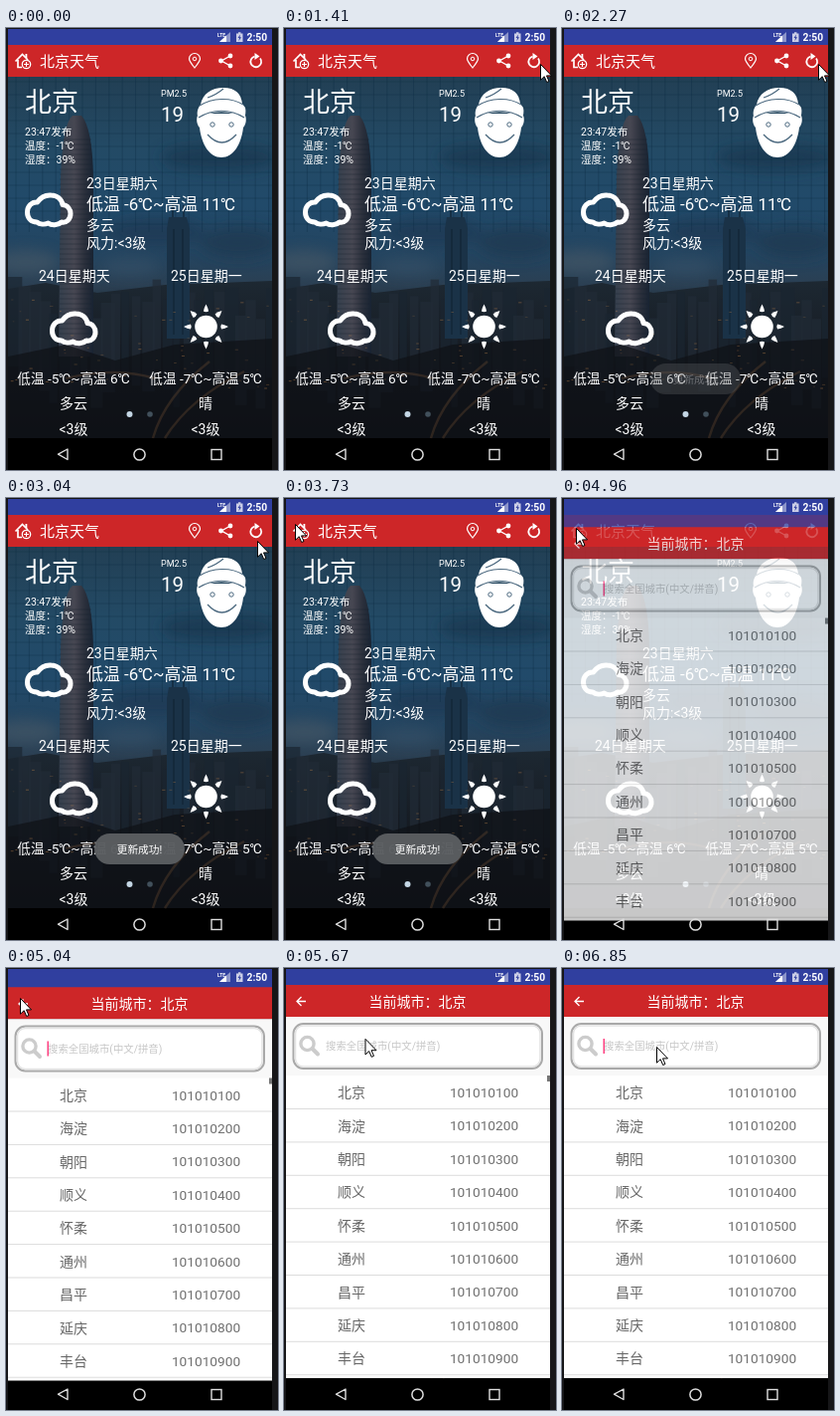
Recreate the animation shown at these times as an HTML page. Size 274 px wide and 444 px high, loop 8000 ms.

```html
<!DOCTYPE html>
<html lang="zh">
<head>
<meta charset="utf-8">
<style>
html, body { margin: 0; width: 100%; height: 100%; overflow: hidden; background: #161618; }
svg { display: block; width: 100%; height: 100%; }
text { font-family: Roboto, 'Noto Sans CJK SC', 'Noto Sans CJK', sans-serif; white-space: pre; }
</style>
</head>
<body>
<svg id="stage" viewBox="0 0 274 444"></svg>
<script>
const LOOP = 8000, STEP = 75;

const text = (x, y, size, str, fill = '#fff', anchor = 'start', extra = '') =>
  `<text x="${x}" y="${y}" font-size="${size}" fill="${fill}" text-anchor="${anchor}" ${extra}>${str.replace(/</g, '&lt;')}</text>`;
const mid = (x, y, size, str, fill) => text(x, y, size, str, fill, 'middle');
const rect = (x, y, w, h, fill, extra = '') =>
  `<rect x="${x}" y="${y}" width="${w}" height="${h}" fill="${fill}" ${extra}/>`;
const path = (d, fill, extra = '') => `<path d="${d}" fill="${fill}" ${extra}/>`;
const line = (d, color, width, extra = '') =>
  path(d, 'none', `stroke="${color}" stroke-width="${width}" ${extra}`);
const circle = (x, y, r, fill, extra = '') =>
  `<circle cx="${x}" cy="${y}" r="${r}" fill="${fill}" ${extra}/>`;
const ellipse = (x, y, rx, ry, fill, extra = '') =>
  `<ellipse cx="${x}" cy="${y}" rx="${rx}" ry="${ry}" fill="${fill}" ${extra}/>`;
const repeat = (n, f) => Array.from({ length: n }, (_, i) => f(i)).join('');

const gradient = (id, stops, end = 'x2="0" y2="1"') =>
  `<linearGradient id="${id}" x1="0" y1="0" ${end}>` +
  stops.map(([o, c]) => `<stop offset="${o}" stop-color="${c}"/>`).join('') + '</linearGradient>';

const defs = `<defs>
  ${gradient('sky', [[0, '#223f54'], [.2, '#234a65'], [.36, '#214a6a'], [.5, '#24445f'], [.58, '#2b3f52'], [.68, '#1c2630'], [1, '#0e1115']])}
  ${gradient('tower', [[0, '#343f4d'], [.45, '#474752'], [.75, '#2b303c'], [1, '#182332']], 'x2="1" y2="0"')}
  ${gradient('ground', [[0, '#1d2832'], [.4, '#171d25'], [1, '#0c0e12']])}
  <filter id="soft" x="-50%" y="-50%" width="200%" height="200%"><feGaussianBlur stdDeviation="7"/></filter>
  <clipPath id="phone"><rect x="2" y="1" width="266" height="443"/></clipPath>
</defs>`;

let seed = 7;
const rnd = () => (seed = seed * 16807 % 2147483647) / 2147483647;

function photo() {
  const grid = repeat(12, i => `M2 ${54 + i * 13}H268`) + repeat(20, i => `M${10 + i * 13.4} 48V205`);
  const floors = repeat(40, i => `M54 ${112 + i * 5}H86`);
  const blocks = repeat(26, i => rect(2 + i * 10.4, 250 + rnd() * 45, 6 + rnd() * 9, 90, rnd() < .5 ? '#1b2631' : '#222c37', 'opacity=".7"'));
  const lights = repeat(60, () => rect(4 + rnd() * 260, 272 + rnd() * 90, 1.5 + rnd() * 2, 1, '#b9804a', `opacity="${.15 + rnd() * .3}"`));
  const clouds = ellipse(215, 130, 60, 14, '#16324a') + ellipse(150, 205, 50, 14, '#1b3650') +
    ellipse(235, 215, 40, 16, '#1b344b') + ellipse(20, 235, 34, 12, '#4a5a68') + ellipse(125, 240, 30, 9, '#38526a');
  return rect(2, 48, 266, 364, 'url(#sky)') +
    `<g filter="url(#soft)" opacity=".6">${clouds}</g>` +
    line(grid, '#0d2a3f', 1, 'opacity=".3"') +
    path('M2 262L40 256L92 266L160 258L268 254V412H2Z', 'url(#ground)') + blocks +
    path('M53 330L55 150Q57 96 67 88H76Q87 100 88 150V330Z', 'url(#tower)') +
    line(floors, '#141d28', 1, 'opacity=".35"') +
    path('M162 312V202L164 190H182L185 202V312Z', '#1a3247') +
    line('M168 190V178M179 190V178M169 202V308M178 202V308', '#122636', 1.3) +
    path('M2 330L60 318L110 334L170 318L268 312V412H2Z', '#0f1217', 'opacity=".75"') + lights +
    line('M148 412Q160 370 205 335M160 412Q185 372 240 345M60 352Q110 340 150 352', '#6b4a33', 2.5, 'opacity=".35"');
}

const cloud = (x, y) => line(
  'M12 30C6 30 2.500 25.500 2.500 20C2.500 14 7 9.500 12.500 10C16 5 21 2.500 26.500 3C32.500 3.200 37 7 38 12.500C43 13 46 17 46 21.500C46 27 42 31 37 30C33 33.500 27 33.500 23.500 31C20 32.500 15 32.500 12 30Z',
  '#fff', 5, `stroke-linejoin="round" transform="translate(${x} ${y})"`);

const sun = (x, y) => `<g transform="translate(${x} ${y})">` + circle(0, 0, 11.3, '#fff') +
  repeat(8, i => path('M-2.6 -15.500Q0 -14 2.600 -15.500Q2 -19 0 -22.500Q-2 -19 -2.600 -15.500Z', '#fff', `transform="rotate(${i * 45})"`)) + '</g>';

const face = () => {
  const ink = '#4d6a80';
  return path('M194 86C191 90 192 97 195 100C197 117 205 130 217 130C229 130 237 117 239 100C242 97 243 90 240 86Z', '#fff') +
    path('M196 77C198 66 207 60 219 60C231 60 237 66 238 76L241 80C242 84 241 88 240 91C226 82 208 82 194 91C192 87 192 82 196 77Z', '#fff') +
    line('M195 78C208 70 226 69 239 77M194 90C208 81 226 81 240 90M203 70Q212 67 219 61', ink, 1.1) +
    circle(208, 97, 2.2, 'none', `stroke="${ink}"`) + circle(227, 97, 2.2, 'none', `stroke="${ink}"`) +
    line('M203 107Q217.500 123 232 107', ink, 1.3);
};

const forecast = (x, day, temp, sky) =>
  mid(x + .8, 254, 14, day) + mid(x, 357, 13.6, temp) + mid(x, 382, 14, sky) + mid(x, 408, 14, '<3级');

function bars() {
  return rect(2, 1, 266, 16, '#303f9f') + rect(2, 17, 266, 32, '#cd2628');
}

function weather() {
  const icons =
    line('M9.500 33.500L16.500 26.500L22 32M12 32V39.500H16', '#fff', 1.7) + rect(19.5, 26, 1.8, 4, '#fff') +
    circle(20.5, 36.5, 4.2, '#cd2628', 'stroke="#fff" stroke-width="1.3"') +
    line('M18 36.500H23M20.500 34V39', '#fff', 1.2) +
    line('M190 40C186 35 184.500 33 184.500 31A5.500 5.500 0 0 1 195.500 31C195.500 33 194 35 190 40Z', '#fff', 1.2) +
    circle(190, 31, 1.8, 'none', 'stroke="#fff"') +
    line('M226 28L217 33L226 38', '#fff', 1.4) +
    circle(226, 28, 2.4, '#fff') + circle(216.5, 33, 2.4, '#fff') + circle(226, 38, 2.4, '#fff') +
    line('M256 30.500A5.400 5.400 0 1 1 250.500 28.600', '#fff', 1.8) + path('M250.500 25L255.500 28.500L250.500 32Z', '#fff');
  return photo() + bars() + icons +
    text(34, 38.5, 15, '北京天气') +
    text(19, 84, 27, '北京') +
    text(19, 108, 10.5, '23:47发布') + text(19, 122, 10.5, '温度：-1℃') + text(19, 136, 10.5, '湿度：39%') +
    text(156, 69, 9, 'PM2.5') + text(156, 94, 20.5, '19') + face() +
    cloud(19, 165) +
    text(81, 161, 14, '23日星期六') + text(81, 183, 16.9, '低温 -6℃~高温 11℃') +
    text(81, 203, 14, '多云') + text(81, 221, 14, '风力:<3级') +
    forecast(68, '24日星期天', '低温 -5℃~高温 6℃', '多云') +
    forecast(201, '25日星期一', '低温 -7℃~高温 5℃', '晴') +
    cloud(44, 284) + sun(201.5, 300) +
    circle(124.5, 388, 3, '#c4d6e4') + circle(145, 388, 2.8, '#5c7280', 'opacity=".65"');
}

function cities() {
  const names = ['北京', '海淀', '朝阳', '顺义', '怀柔', '通州', '昌平', '延庆', '丰台'];
  const rows = names.map((name, i) => {
    const y = 125 + i * 33.4;
    return mid(68, y + 5.2, 14, name, '#666') + mid(201.5, y + 5, 13.7, `101010${i + 1}00`, '#707070') +
      rect(2, y + 16, 266, 1, '#dcdcdc');
  }).join('');
  return bars() + rect(2, 49, 266, 363, '#fff') + rect(2, 49, 266, 59, '#f8f8f8') +
    line('M22 33.500H13M17.500 29L13 33.500L17.500 38', '#fff', 1.3) +
    mid(134.5, 38.5, 14, '当前城市：北京') +
    rect(9.5, 56, 250.5, 45, '#fff', 'rx="10" stroke="#a9a9a9" stroke-width="2"') +
    rect(11.5, 58, 246.5, 41, 'none', 'rx="8" stroke="#e4e4e4" stroke-width="1.5"') +
    circle(23.5, 76, 6.6, 'none', 'stroke="#ccc" stroke-width="3.4"') +
    line('M28.500 81L34 86.500', '#ccc', 4, 'stroke-linecap="round"') +
    text(42, 82, 10.4, '搜索全国城市(中文/拼音)', '#c6c6c6') +
    rect(41.5, 71, 1.5, 15, '#ff4081', 'id="caret"') + rows +
    rect(265, 108, 3, 6, '#777', 'id="thumb"');
}

const status =
  text(213, 8.5, 5, 'LTE', '#fff', 'start', 'font-weight="700"') +
  path('M215 14L226 4V14Z', '#fff', 'opacity=".45"') + path('M215 14L222 7.600V14Z', '#fff') +
  path('M232 5.500H234V4.300H236.500V5.500H238.500V14H232Z', '#fff', 'opacity=".75"') +
  path('M236 6.500L233.500 10H235L234.500 13L237 9.300H235.500Z', '#303f9f') +
  text(242.5, 13, 10.3, '2:50', '#fff', 'start', 'font-weight="600"');

const nav = line('M62 423V433.500L52.500 428.200Z', '#ddd', 1.4, 'stroke-linejoin="round"') +
  circle(134.5, 428.5, 5.6, 'none', 'stroke="#ddd" stroke-width="1.5"') +
  rect(207, 423.5, 10, 10, 'none', 'stroke="#ddd" stroke-width="1.4"');

const toast = rect(89, 337, 91, 31, '#5a5d60', 'rx="15.5" opacity=".97"') + mid(134.5, 356.5, 10.7, '更新成功!');

const stage = document.getElementById('stage');
stage.innerHTML = defs + rect(0, 0, 274, 444, '#161618') + `<g clip-path="url(#phone)">
  ${rect(2, 412, 266, 32, '#000')}${weather()}
  <g id="toast">${toast}</g><g id="page">${cities()}</g>${status}${nav}</g>
  <g id="cursor">${path('M.500 .500V16.200L4.200 12.700L6.700 18.500L9 17.500L6.500 11.900H11.500Z', '#fff', 'stroke="#000" stroke-width="1"')}</g>`;

const [toastEl, page, caret, thumb, cursor] =
  ['toast', 'page', 'caret', 'thumb', 'cursor'].map(id => document.getElementById(id));

// Cursor trips: start time, number of steps, waypoints
const trips = [
  [410, 11, [[214, 440], [212, 330], [218, 220], [234, 130], [250, 75], [258, 46]]],
  [1260, 3, [[258, 46], [258, 36]]],
  [3040, 11, [[258, 36], [253, 43], [235, 58], [200, 69], [155, 73], [110, 68], [70, 55], [40, 40], [20, 28], [9, 23], [11, 26], [14, 30]]],
  [5360, 6, [[14, 30], [95, 79]]]
];

// Progress 0..1 in discrete steps, the first one taken at t0
const steps = (t, t0, n) => Math.min(n, Math.max(0, Math.floor((t - t0) / STEP) + 1)) / n;

function along(pts, p) {
  const f = p * (pts.length - 1), i = Math.min(Math.floor(f), pts.length - 2), k = f - i;
  return [0, 1].map(a => pts[i][a] + (pts[i + 1][a] - pts[i][a]) * k);
}

const show = (el, on) => el.setAttribute('opacity', +on);

function render(t) {
  const trip = trips.filter(([t0]) => t >= t0).pop();
  show(cursor, !!trip);
  if (trip) {
    const [x, y] = along(trip[2], steps(t, trip[0], trip[1]));
    cursor.setAttribute('transform', `translate(${x} ${y})`);
  }
  show(toastEl, steps(t, 2110, 8) - steps(t, 3890, 7));

  show(page, t < 4960 ? 0 : t < 5040 ? .78 : 1);
  page.setAttribute('transform', `translate(0 ${t < 5040 ? 12.5 : t < 5130 ? 2.5 : 0})`);
  show(caret, t < 5390 || (t >= 5890 && t < 6450) || t >= 6850);
  show(thumb, t < 6130 ? 1 : t < 6290 ? .65 : t < 6450 ? .3 : 0);
}

const start = performance.now();
function tick() {
  render((performance.now() - start) % LOOP);
  requestAnimationFrame(tick);
}
render(0);
requestAnimationFrame(tick);
</script>
</body>
</html>
```
